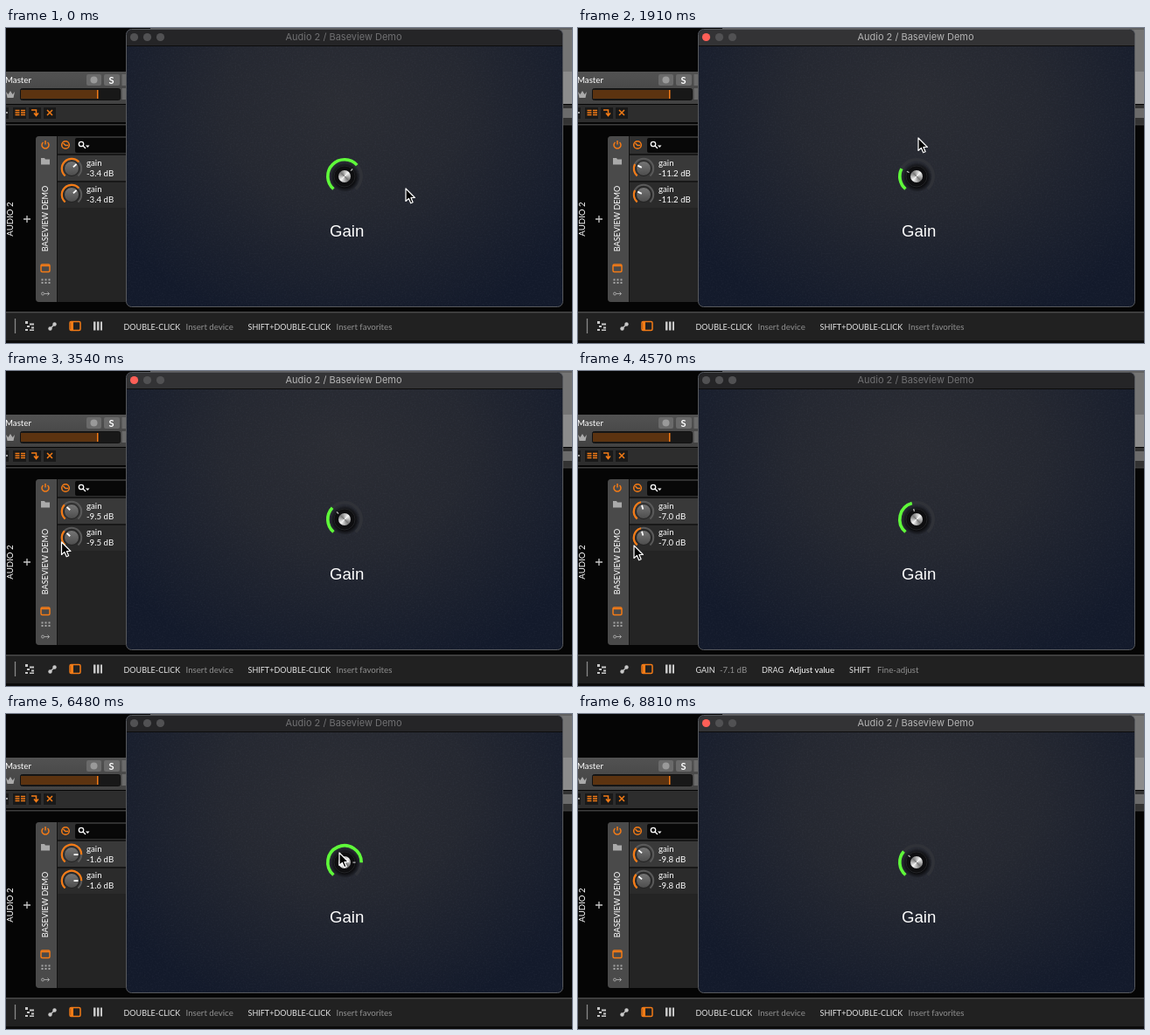
An HTML page that plays this animation: 647x361 px, repeating every 9560 ms.

```html
<!DOCTYPE html>
<html lang="en">
<head>
<meta charset="utf-8">
<title>Audio 2 / Baseview Demo</title>
<style>
  html, body { margin: 0; width: 100%; height: 100%; overflow: hidden; background: #050505; }
  svg { display: block; width: 647px; height: 361px; }
  text { font-family: Lato, sans-serif; font-size: 9.7px; fill: #fff; white-space: pre; }
  .caps { font-size: 9px; fill: #e4e4e4; }
  .dim { fill: #909090; }
  .title { font: 11px Inter, sans-serif; text-anchor: middle; }
  .label { font: 18.6px "Liberation Sans", Arial, sans-serif; }
  .orange { fill: none; stroke: #f47b16; stroke-width: 1.5; }
  .line { fill: none; stroke: #c8c8c8; stroke-width: 1.3; }
  .cap { width: 14px; height: 14px; border-radius: 50%;
    background: conic-gradient(from 45deg, #f2f2f2, #777 25%, #f2f2f2 50%, #777 75%, #f2f2f2); }
</style>
</head>
<body>
<svg viewBox="0 0 647 361">
  <defs>
    <radialGradient id="panel" gradientUnits="userSpaceOnUse" cx="0" cy="0" r="1"
        gradientTransform="translate(387 85) scale(310 270)">
      <stop offset="0" stop-color="#2b2d34"/>
      <stop offset=".45" stop-color="#252831"/>
      <stop offset="1" stop-color="#131a2b"/>
    </radialGradient>
    <linearGradient id="track" x2="0" y2="1">
      <stop offset="0" stop-color="#525252"/><stop offset="1" stop-color="#424242"/>
    </linearGradient>
    <linearGradient id="dial" x2="0" y2="1">
      <stop offset="0" stop-color="#777"/><stop offset="1" stop-color="#4c4c4c"/>
    </linearGradient>
    <radialGradient id="shade">
      <stop offset=".65" stop-color="#08080a"/><stop offset="1" stop-color="#08080a" stop-opacity="0"/>
    </radialGradient>
    <filter id="grain" x="0" y="0" width="1" height="1" color-interpolation-filters="sRGB">
      <feTurbulence type="fractalNoise" baseFrequency=".55" numOctaves="2"/>
      <feColorMatrix values="0 0 0 0 .5  0 0 0 0 .52  0 0 0 0 .58  .6 0 0 0 -.26"/>
    </filter>
  </defs>

  <!-- track header -->
  <rect width="647" height="361" fill="#050505"/>
  <rect x="600" width="47" height="50" fill="#747474"/>
  <rect x="600" y="50" width="47" height="37" fill="#8c8c8c"/>
  <rect x="600" y="88" width="47" height="22" fill="#333"/>
  <rect x="600" y="92" width="47" height="11" fill="#6b6b6b"/>
  <rect x="165" width="482" height="2" fill="#606060"/>
  <rect y="50" width="140" height="37" fill="url(#track)"/>
  <rect y="88" width="140" height="20" fill="#2d2d2d"/>
  <rect y="110" width="647" height="1.5" fill="#3d3d3d"/>
  <text x="-1" y="63">Master</text>
  <rect x="92" y="53" width="17" height="13" rx="2" fill="#6a6a6a"/>
  <circle cx="100.5" cy="59.5" r="4" fill="#999"/>
  <rect x="112" y="53" width="18" height="13" rx="2" fill="#6a6a6a"/>
  <text x="117.5" y="63.5" font-weight="bold" style="font-size:11px">S</text>
  <path d="M132.500 53h6v13h-6zM132.500 69h6v13h-6z" fill="#6a6a6a"/>
  <path d="M0 73l2.500 3 2.500-4 2.500 4 2.500-3-1.500 7h-7z" fill="#aaa"/>
  <rect x="16.500" y="69.500" width="114" height="13" rx="2" fill="#181818" stroke="#111"/>
  <rect x="17" y="71" width="88" height="10" fill="#5c3310"/>
  <rect x="104" y="71" width="1.500" height="10" fill="#f47b16"/>
  <path d="M8 91h15v13H8zM26 91h14v13H26zM43 91h14v13H43zM-5 91h8v13h-8z" fill="#191919"/>
  <path class="orange" d="M10.500 94.500h5m1.500 0h5M10.500 97h5m1.500 0h5M10.500 99.500h5m1.500 0h5M29 94h5.500v6m-2.500-2.500 2.500 3 2.500-3M47 94l6 6m0-6l-6 6"/>
  <path d="M0 97h2" class="line"/>

  <!-- device -->
  <text text-anchor="middle" transform="translate(8 219) rotate(-90)">AUDIO 2</text>
  <path class="line" d="M20 219h8m-4-4v8"/>
  <rect x="34" y="124" width="110" height="190" rx="4" fill="#242424"/>
  <path d="M58 124H38a4 4 0 0 0-4 4v182a4 4 0 0 0 4 4h20z" fill="#4a4a4a"/>
  <path d="M58.500 124v190" stroke="#111"/>
  <rect x="59" y="124" width="80" height="20" fill="#303030"/>
  <rect x="79" y="126" width="60" height="17" rx="2" fill="#080808"/>
  <rect x="59" y="146" width="80" height="29" fill="#393939"/>
  <rect x="59" y="177" width="80" height="29" fill="#2b2b2b"/>
  <path d="M59 145h80M59 176h80" stroke="#151515" stroke-width="1.500"/>
  <path class="orange" d="M45 129v4.500M42.500 131a4 4 0 1 0 5 0"/>
  <path d="M40 149h4l1 1.500h5v6H40z" fill="#aaa"/>
  <text text-anchor="middle" transform="translate(48 218.500) rotate(-90)" style="font-size:9.100px">BASEVIEW DEMO</text>
  <rect class="orange" x="40" y="271" width="10" height="8.500" rx="1.500"/>
  <path class="orange" d="M40 272.500h10"/>
  <path d="M40.500 288.500h10M40.500 292h10" stroke="#a5a5a5" stroke-width="2" stroke-dasharray="2 2"/>
  <path class="line" style="stroke:#a5a5a5;stroke-width:1" d="M40.500 304.500a1.500 1.500 0 1 0 3 0a1.500 1.500 0 1 0-3 0M44 304.500h5.500m-2-2 2 2-2 2"/>
  <circle class="orange" cx="68" cy="134" r="4.300"/>
  <path class="orange" d="M65.500 132l2.500 2.500h3"/>
  <circle class="line" cx="86" cy="133" r="2.700" style="stroke:#fff"/>
  <path class="line" d="M88 135l3 3" style="stroke:#fff"/>
  <path d="M91 134.500h4.500l-2.200 2.500z" fill="#fff"/>
  <g id="dials"></g>

  <!-- status bar -->
  <rect y="325" width="647" height="33" fill="#212121"/>
  <rect y="325" width="647" height="1.500" fill="#484848"/>
  <rect y="358" width="647" height="3" fill="#0b0b0b"/>
  <path d="M10.500 333v17" stroke="#888" stroke-width="1.300"/>
  <path d="M22 336h3v3h-3zM27 338.500h5v2h-5zM24 341h3v2h-3zM29 342.500h3v2h-3zM22 345h3v2h-3zM27 345.500h5v1.500h-5z" fill="#c8c8c8"/>
  <path class="line" d="M51 344l4-4"/>
  <circle cx="50.500" cy="344.500" r="2.200" fill="#c8c8c8"/><circle cx="55.500" cy="339.500" r="2.200" fill="#c8c8c8"/>
  <rect class="orange" x="73" y="336.500" width="12" height="10" rx="1.500"/>
  <path d="M74 337h3v9h-3z" fill="#f47b16"/>
  <path d="M100 336.500h2.500v10h-2.500zM104 336.500h2.500v10h-2.500zM108 336.500h2v10h-2z" fill="#c8c8c8"/>
  <g id="idleStatus">
    <text class="caps" x="134.500" y="345.500">DOUBLE-CLICK</text><text class="dim" x="205.500" y="345.500">Insert device</text>
    <text class="caps" x="276.500" y="345.500">SHIFT+DOUBLE-CLICK</text><text class="dim" x="377.500" y="345.500">Insert favorites</text>
  </g>
  <g id="dragStatus">
    <text class="caps" x="134.500" y="345.500">GAIN</text><text class="dim" id="statusValue" x="162" y="345.500"></text>
    <text class="caps" x="210" y="345.500">DRAG</text><text x="241" y="345.500">Adjust value</text>
    <text class="caps" x="310" y="345.500">SHIFT</text><text class="dim" x="342" y="345.500">Fine-adjust</text>
  </g>

  <!-- plugin window -->
  <rect x="137.500" y="1.500" width="499" height="318" rx="6" fill="url(#panel)"/>
  <rect x="138" y="21" width="498" height="298" filter="url(#grain)" opacity=".25"/>
  <path id="titleBar" d="M138 20.500V8a6 6 0 0 1 6-6h486a6 6 0 0 1 6 6v12.500z"/>
  <path d="M138 20.500h498" stroke="#0c0c0c"/>
  <rect x="137.500" y="1.500" width="499" height="318" rx="6" fill="none" stroke="#56585c"/>
  <circle id="closeButton" cx="146.500" cy="10.500" r="4.600"/>
  <circle cx="161.500" cy="10.500" r="4.600" fill="#515153"/><circle cx="176.500" cy="10.500" r="4.600" fill="#515153"/>
  <text class="title" id="title" x="386" y="14.300">Audio 2 / Baseview Demo</text>
  <path id="gainTrack" fill="none" stroke="#303238" stroke-width="3.500"/>
  <path id="gainArc" fill="none" stroke="#5ffa3a" stroke-width="3.600"/>
  <circle cx="387.500" cy="171" r="17" fill="url(#shade)"/>
  <circle cx="387" cy="170" r="12" fill="#0e0e10" stroke="#222326"/>
  <path id="gainTick" d="M387 160.500v-3" stroke="#b8b8b8" stroke-width="1.300"/>
  <foreignObject x="380" y="163" width="14" height="14"><div class="cap"></div></foreignObject>
  <text class="label" x="370" y="239">Gain</text>

  <path id="cursor" d="M0 0V14.500L3.400 11.400 5.700 16.800 8.100 15.800 5.900 10.500H10.400Z" fill="#000" stroke="#fff" stroke-width="1.200" stroke-linejoin="round"/>
</svg>
<script>
const LOOP = 9560, SWEEP = 139;
const $ = id => document.getElementById(id);

// Keys are [step, value, ...]; one step is about 147 ms.
const cursorKeys = [
  [0, 457, 184], [5, 389, 165], [9, 389, 243], [13, 389, 126], [14, 389, 118], [16, 389, 150],
  [18, 330, 180], [21, 66, 194], [22, 66, 194], [24, 63.5, 196], [25, 64, 200], [39, 64, 200],
  [43, 372, 163], [44, 381, 159], [45, 381, 164], [49, 381, 308], [52, 381, 248],
  [55, 384, 166], [58, 391, 298]
];
const gainKeys = [
  [0, .672], [5, .672], [8, 1], [10, 1], [13, .274], [14, .2], [16, .29], [18, .333],
  [26, .333], [29, .13], [32, .6], [34, .92], [35, .92], [38, .826], [45, .826],
  [47, 1], [52, 1], [55, .322]
];

function sample(keys, step) {
  const i = keys.findIndex(key => key[0] > step);
  if (i < 0) return keys[keys.length - 1].slice(1);
  const a = keys[i - 1], b = keys[i], k = (step - a[0]) / (b[0] - a[0]);
  return a.slice(1).map((v, j) => v + (b[j + 1] - v) * k);
}

function arc(cx, cy, r, from, to) {
  const point = deg => {
    const rad = deg * Math.PI / 180;
    return `${cx + r * Math.sin(rad)} ${cy - r * Math.cos(rad)}`;
  };
  return `M${point(from)}A${r} ${r} 0 ${+(to - from > 180)} 1 ${point(to)}`;
}

const angleOf = gain => (gain * 2 - 1) * SWEEP;

const dials = [161, 191].map(y => {
  const group = document.createElementNS("http://www.w3.org/2000/svg", "g");
  group.innerHTML = `
    <path d="${arc(75, y, 11.2, -SWEEP, SWEEP)}" fill="none" stroke="#5a5a5a" stroke-width="2"/>
    <path class="arc" fill="none" stroke="#f47b16" stroke-width="2.2"/>
    <circle cx="75" cy="${y}" r="8.5" fill="url(#dial)" stroke="#222"/>
    <path class="hand" d="M75 ${y - 2.5}v-5" stroke="#fff" stroke-width="1.8"/>
    <text x="92" y="${y - 3}">gain</text><text class="value" x="92" y="${y + 9}"></text>`;
  $("dials").append(group);
  return { y, part: name => group.querySelector("." + name) };
});
$("gainTrack").setAttribute("d", arc(387, 170, 19.2, -SWEEP, SWEEP));

function draw(time) {
  const step = Math.floor((time < 5610 ? time / 147.6 : 38 + (time - 5610) / 145.4) + .08);
  const [gain] = sample(gainKeys, step);
  const [x, y] = sample(cursorKeys, step);
  const angle = angleOf(gain), db = 20 * Math.log10(gain);
  const active = step >= 6 && step < 25 || step >= 45;
  const hostDrag = step >= 25 && step < 40;

  for (const dial of dials) {
    dial.part("arc").setAttribute("d", arc(75, dial.y, 11.2, -SWEEP, angle));
    dial.part("hand").setAttribute("transform", `rotate(${angle} 75 ${dial.y})`);
    dial.part("value").textContent = (Math.trunc(db * 10) / 10).toFixed(1) + " dB";
  }
  $("gainArc").setAttribute("d", arc(387, 170, 19.2, -SWEEP, angle));
  $("gainTick").setAttribute("transform", `rotate(${angle} 387 170)`);
  $("titleBar").setAttribute("fill", active ? "#333335" : "#252527");
  $("closeButton").setAttribute("fill", active ? "#fe5f57" : "#515153");
  $("title").style.fill = active ? "#b4b4b4" : "#707072";
  $("idleStatus").style.display = hostDrag ? "none" : "";
  $("dragStatus").style.display = hostDrag ? "" : "none";
  $("statusValue").textContent = db.toFixed(1) + " dB";
  $("cursor").setAttribute("transform", `translate(${x} ${y})`);
  $("cursor").style.display = step < 60 ? "" : "none";
}

const start = performance.now();
function tick() {
  draw((performance.now() - start) % LOOP);
  requestAnimationFrame(tick);
}
tick();
</script>
</body>
</html>
```
